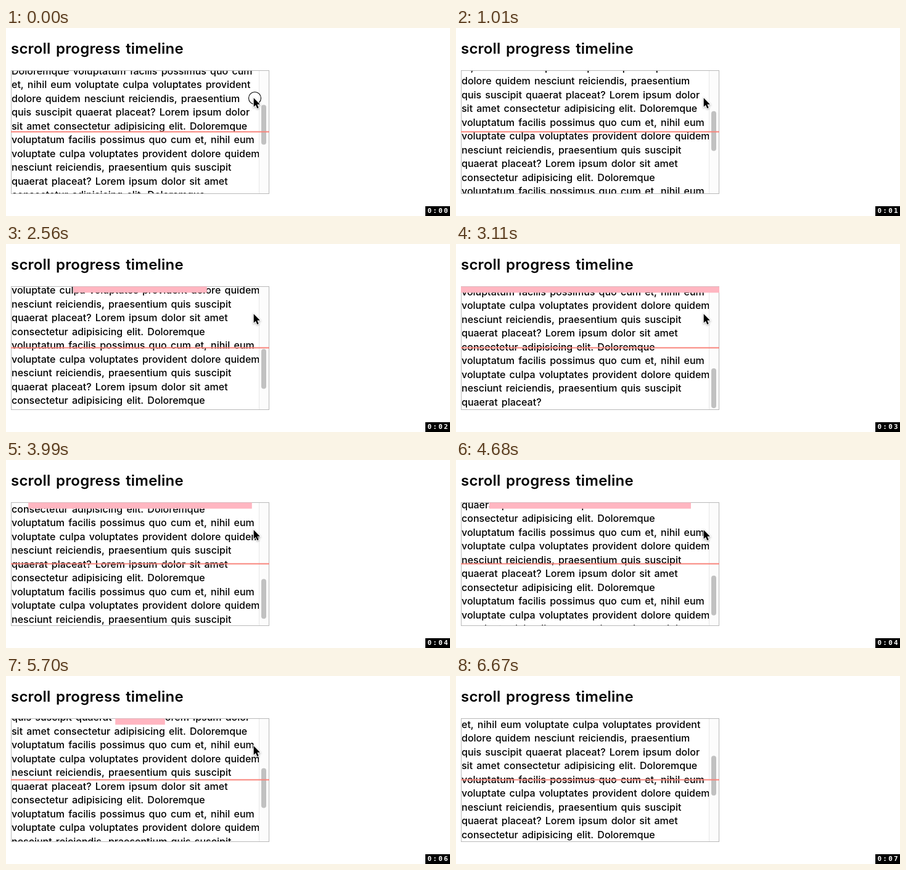
These frames come from a looping animation (720 by 307 pixels, 7.42 s). An HTML page with a canvas:

```html
<!DOCTYPE html>
<html lang="en">
<head>
<meta charset="utf-8">
<title>scroll progress timeline</title>
<style>
  html, body { margin: 0; width: 100%; height: 100%; overflow: hidden; background: #fff; }
  canvas { display: block; }
</style>
</head>
<body>
<canvas id="stage" width="720" height="307"></canvas>
<script>
const ctx = document.getElementById('stage').getContext('2d');
const LOOP = 7420, LINE = 22.5, MAX_SCROLL = 364, START = 147;
const BOX = { x: 8, y: 69, w: 419, h: 202 };

// Scroll gestures: start, end, and scroll distance from START at the end.
const gestures = [
  [20, 360, 14], [600, 1010, 28.5], [1250, 1600, 63.4], [1900, 2140, 95],
  [2380, 2680, 141], [2850, 3110, 217], [3560, 3990, 192.5], [4260, 4440, 177],
  [4680, 5180, 139.3], [5360, 5700, 70], [5940, 6190, 13.5]
];
const ticks = [1000, 2000, 3000, 3990, 5000, 5690, 6660];

// The visible part of the paragraph begins at its seventh line.
const opening = [
  'Doloremque voluptatum facilis possimus quo cum',
  'et, nihil eum voluptate culpa voluptates provident',
  'dolore quidem nesciunt reiciendis, praesentium',
  'quis suscipit quaerat placeat? Lorem ipsum dolor',
  'sit amet consectetur adipisicing elit. Doloremque'
];
const refrain = [
  'voluptatum facilis possimus quo cum et, nihil eum',
  'voluptate culpa voluptates provident dolore quidem',
  'nesciunt reiciendis, praesentium quis suscipit',
  'quaerat placeat? Lorem ipsum dolor sit amet',
  'consectetur adipisicing elit. Doloremque'
];
const lines = [...opening, ...refrain, ...refrain, ...refrain.slice(0, 3), 'quaerat placeat?'];

const titleStyle = { font: '600 24px Inter, sans-serif', letter: 0.2, word: 2.2 };
const bodyStyle = { font: '450 16px Inter, sans-serif', word: 1.9 };
const clockStyle = { font: 'bold 11px "DejaVu Sans Mono", monospace', color: '#fff', letter: 2.2 };

const clamp = v => Math.min(1, Math.max(0, v));
const ease = p => { const q = p ** 0.8; return q * q * (3 - 2 * q); };

function scrollAt(t) {
  let pos = 0;
  for (const [from, to, end] of gestures) pos += (end - pos) * ease(clamp((t - from) / (to - from)));
  return pos;
}

function rect(color, x, y, w, h) {
  ctx.fillStyle = color;
  ctx.fillRect(x, y, w, h);
}

function text(str, x, y, { font, color = '#000', letter = 0, word = 0 }) {
  ctx.font = font;
  ctx.letterSpacing = letter + 'px';
  ctx.wordSpacing = word + 'px';
  ctx.fillStyle = color;
  ctx.fillText(str, x, y);
}

function drawScroller(pos) {
  const { x, y, w, h } = BOX;
  const progress = (START + pos) / MAX_SCROLL;
  ctx.save();
  ctx.beginPath();
  ctx.rect(x, y + 1, w, h - 2);
  ctx.clip();
  lines.forEach((line, i) => text(line, 9, 75.5 + i * LINE - pos, bodyStyle));
  ctx.restore();

  rect('#fcfcfc', 410, y, 16, h);
  rect('#e8e8e8', 410, y, 1, h);
  ctx.fillStyle = '#c1c1c1';
  ctx.beginPath();
  ctx.roundRect(414, 73 + 130 * progress, 8, 65, 4);
  ctx.fill();
  ctx.strokeStyle = '#b9b9b9';
  ctx.lineWidth = 1;
  ctx.strokeRect(x + .5, y + .5, w - 1, h - 1);

  const bar = w * clamp(2 * progress - 1);
  rect('#ffb6c1', x + (w - bar) / 2, 69.5, bar, 10);
  rect('#f9837b', x, 168.5, w, 2);
}

function drawPointer(t) {
  ctx.save();
  ctx.globalAlpha = 1 - clamp((t - 20) / 180);
  ctx.strokeStyle = '#000';
  ctx.lineWidth = 1.1;
  ctx.beginPath();
  ctx.arc(403.5, 114.5, 10, 0, 7);
  ctx.stroke();

  ctx.globalAlpha = 1 - clamp((t - 6460) / 200);
  ctx.translate(401.7, 114.2);
  const arrow = new Path2D('M0 0V14.5L3.3 11.5L5.6 17L8 16L5.7 10.6H10.2Z');
  ctx.shadowColor = 'rgba(0,0,0,.35)';
  ctx.shadowBlur = 3;
  ctx.shadowOffsetY = 1;
  ctx.strokeStyle = '#fff';
  ctx.lineWidth = 2;
  ctx.stroke(arrow);
  ctx.shadowColor = 'transparent';
  ctx.fillStyle = '#000';
  ctx.fill(arrow);
  ctx.restore();
}

function draw(t) {
  rect('#fff', 0, 0, 720, 307);
  text('scroll progress timeline', 8, 41.5, titleStyle);
  drawScroller(scrollAt(t));
  drawPointer(t);
  rect('#000', 680, 291, 40, 16);
  const seconds = ticks.filter(tick => t >= tick).length;
  text('0:0' + seconds, 683.5, 302, clockStyle);
}

const begin = performance.now();
function frame() {
  draw((performance.now() - begin) % LOOP);
  requestAnimationFrame(frame);
}
frame();
</script>
</body>
</html>
```
